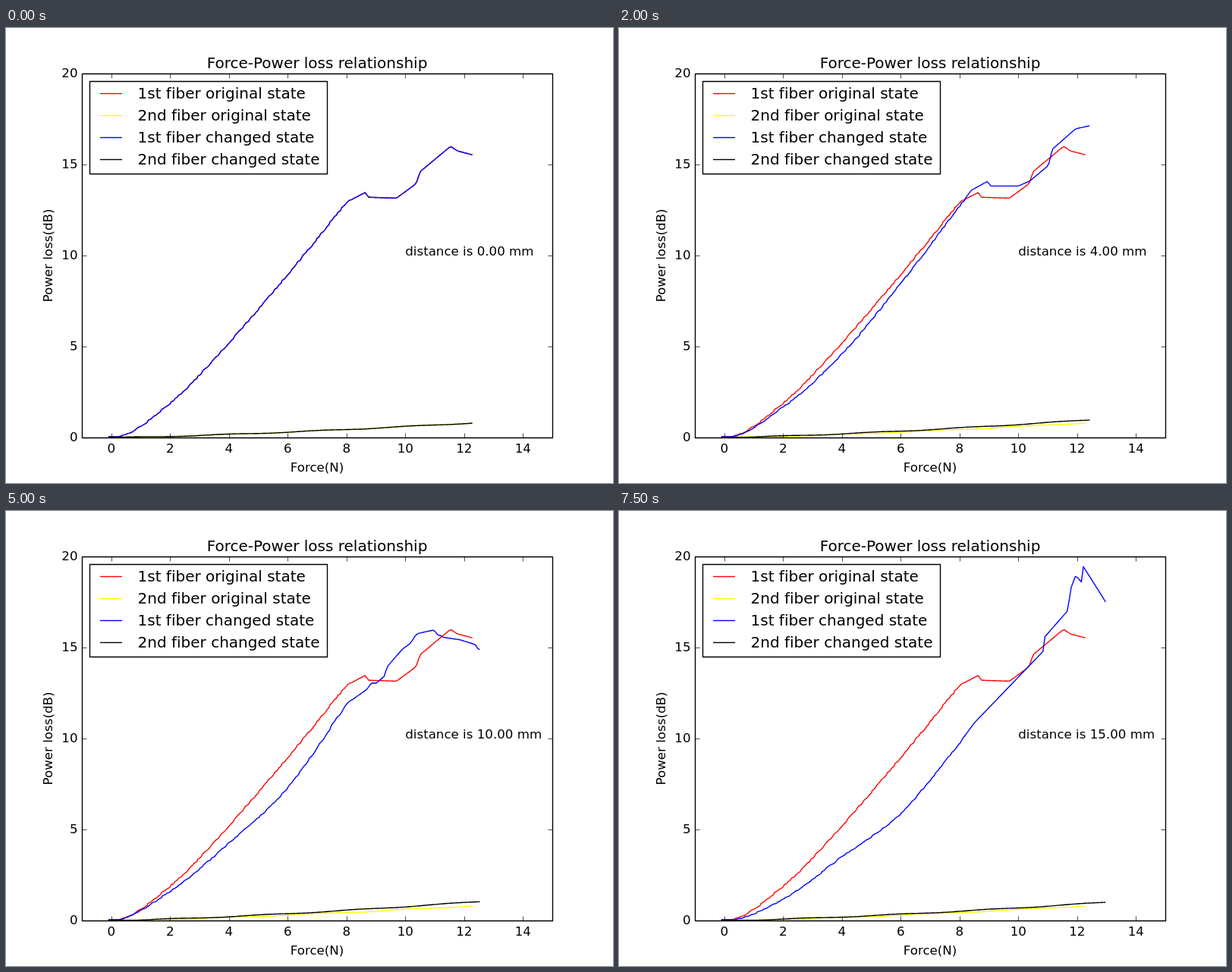
Write an HTML page that moves like this. It is 800 by 600 pixels and loops after 8000 ms.

```html
<!DOCTYPE html>
<html lang="en">
<head>
<meta charset="utf-8">
<style>
html, body { margin: 0; width: 100%; height: 100%; overflow: hidden; background: #fff; }
svg { display: block; font: 16.667px "DejaVu Sans", sans-serif; font-variant-ligatures: none; }
.line, .frame { fill: none; stroke-width: 1.389; stroke-linejoin: round; }
.frame { stroke: #000; }
.tick { stroke: #000; stroke-width: .694; }
.big { font-size: 20px; }
.mid { text-anchor: middle; }
.end { text-anchor: end; }
</style>
</head>
<body>
<svg width="800" height="600" viewBox="0 0 800 600">
  <clipPath id="plot"><rect x="100" y="60" width="620" height="480.5"/></clipPath>
  <g id="curves" clip-path="url(#plot)"></g>
  <g id="axes"></g>
  <rect class="frame" x="100.5" y="60.5" width="620" height="480"/>
  <text class="big mid" x="410" y="53">Force-Power loss relationship</text>
  <text class="mid" x="410" y="585">Force(N)</text>
  <text class="mid" transform="translate(61 300) rotate(-90)">Power loss(dB)</text>
  <text id="distance" x="526.25" y="300"></text>
  <rect class="frame" x="110.5" y="70.5" width="313" height="122" style="fill:#fff"/>
  <g id="legend"></g>
</svg>
<script>
const STEP = 500, COUNT = 16, SAMPLES = 190, START = -0.1;
const byId = id => document.getElementById(id);
const px = force => 138.75 + 38.75 * force;
const py = loss => 540 - 24 * loss;
const mix = (a, b, t) => a + (b - a) * t;
const hash = k => { const s = Math.sin(k * 127.1 + 3.7) * 43758.5453; return s - Math.floor(s); };

function add(parent, tag, attrs, text = '') {
  const el = document.createElementNS('http://www.w3.org/2000/svg', tag);
  for (const key in attrs) el.setAttribute(key, attrs[key]);
  el.textContent = text;
  return parent.appendChild(el);
}

// rise: first fiber's loss at 2, 4, 6 and 8 N, joined smoothly
// kinks: its "force loss" corners beyond 8 N; tail: second fiber's last loss
const keys = [
  { mm: 0, rise: [1.88, 5.2, 8.95, 12.92], tail: .8,
    kinks: '8.63 13.46, 8.75 13.2, 9.7 13.15, 10.37 13.95, 10.5 14.6, 11.54 16, 11.77 15.75, 12.28 15.53' },
  { mm: 2, rise: [2.12, 5.3, 9.5, 12.4], tail: .85,
    kinks: '8.42 13.5, 9.17 14.95, 10 15.33, 10.12 14.88, 11.18 14.67, 11.31 14.37, 12.19 14.83, 12.26 15.5, 12.47 15.57' },
  { mm: 4, rise: [1.67, 4.58, 8.46, 12.7], tail: .97,
    kinks: '8.4 13.58, 8.98 14.1, 9.02 13.82, 10 13.82, 10.4 14.1, 11.03 14.96, 11.15 15.83, 11.95 16.96, 12.43 17.13' },
  { mm: 8, rise: [1.67, 4.43, 7.6, 13.05], tail: 1.07,
    kinks: '8.65 13.3, 8.8 13.88, 8.96 13.33, 10.12 14.6, 10.3 15.5, 11.13 16.3, 11.23 16, 12.32 15.55, 12.4 14.97, 12.47 14.92' },
  { mm: 11, rise: [1.57, 4.15, 7.15, 11.3], tail: 1.03,
    kinks: '9.32 13.33, 9.4 14.03, 9.92 15.2, 10.46 15.87, 11 15.9, 11.15 15.37, 11.9 15.25, 12.57 14.88' },
  { mm: 13, rise: [1.42, 3.8, 6.7, 10.1], tail: .95,
    kinks: '8.2 10.45, 8.42 11.58, 9.12 13.5, 9.89 14.8, 10.1 14.5, 10.87 14.68, 11 14.33, 11.9 14.58, 12.02 15, 12.73 16.06' },
  { mm: 15, rise: [1.17, 3.5, 5.87, 9.75], tail: 1,
    kinks: '8.5 10.85, 10.85 14.8, 10.9 15.58, 11.67 17, 11.8 18.3, 11.95 18.95, 12.16 18.58, 12.2 19.48, 12.68 18.25, 12.97 17.5' }
];
for (const key of keys) {
  const [a, , c, d] = key.rise;
  key.spline = [a, 0, ...key.rise, 2 * d - c];
  key.corners = [[8, d], ...key.kinks.split(', ').map(pair => pair.split(' ').map(Number))];
  key.end = key.corners.at(-1)[0];
}

function lossAt(key, force) {
  if (force <= 0) return 0;
  if (force < 8) {
    const i = Math.floor(force / 2), t = force / 2 - i;
    const [a, b, c, d] = key.spline.slice(i, i + 4);
    return b + t / 2 * (c - a + t * (2 * a - 5 * b + 4 * c - d + t * (3 * (b - c) + d - a)));
  }
  const i = Math.max(1, key.corners.findIndex(corner => corner[0] >= force));
  const [[f0, l0], [f1, l1]] = [key.corners[i - 1], key.corners[i]];
  return mix(l0, l1, (force - f0) / (f1 - f0));
}

// Curves between two measured distances blend both neighbours
function curves(mm) {
  const hi = keys.find(key => key.mm >= mm);
  const lo = keys.findLast(key => key.mm <= mm);
  const t = hi === lo ? 0 : (mm - lo.mm) / (hi.mm - lo.mm);
  const first = [], second = [];
  for (let i = 0; i <= SAMPLES; i++) {
    const u = i / SAMPLES;
    const at = key => lossAt(key, Math.min(key.end, mix(START, key.end, u)));
    const force = mix(START, mix(lo.end, hi.end, t), u);
    const loss = Math.max(.04, mix(at(lo), at(hi), t));
    const noise = force > .4 && force < 8.2 ? 1.6 * (hash(i + mm * 211) - .5) : 0;
    first.push(`${px(force) + noise},${py(loss) + noise / 2}`);
    const ripple = .02 * Math.sin(2 * force + mm);
    second.push(`${px(force)},${py(Math.max(.01, mix(lo.tail, hi.tail, t) * u ** 1.4 + ripple))}`);
  }
  return [first.join(' '), second.join(' ')];
}

for (let k = 0; k < 8; k++) {
  const x = Math.round(px(2 * k)) + .5;
  add(byId('axes'), 'path', { class: 'tick', d: `M${x} 540.5v-6M${x} 60.5v6` });
  add(byId('axes'), 'text', { class: 'mid', x: px(2 * k), y: 560 }, 2 * k);
}
for (let k = 0; k < 5; k++) {
  const y = py(5 * k) + .5;
  add(byId('axes'), 'path', { class: 'tick', d: `M100.5 ${y}h6M720.5 ${y}h-6` });
  add(byId('axes'), 'text', { class: 'end', x: 94.5, y: y + 4.8 }, 5 * k);
}

const labels = ['1st fiber original state', '2nd fiber original state',
  '1st fiber changed state', '2nd fiber changed state'];
const lines = ['#f00', '#ff0', '#00f', '#000'].map((stroke, i) => {
  const y = 86.5 + 29 * i;
  add(byId('legend'), 'path', { class: 'line', stroke, d: `M124 ${y}h29` });
  add(byId('legend'), 'text', { class: 'big', x: 173.5, y: y + 6.5 }, labels[i]);
  return add(byId('curves'), 'polyline', { class: 'line', stroke });
});

const states = Array.from({ length: COUNT }, (_, mm) => curves(mm));
const show = (offset, pair) => pair.forEach((points, i) => lines[offset + i].setAttribute('points', points));
show(0, states[0]);

const start = performance.now();
let shown = -1;
function draw() {
  const mm = Math.floor((performance.now() - start) / STEP) % COUNT;
  if (mm !== shown) {
    shown = mm;
    show(2, states[mm]);
    byId('distance').textContent = `distance is ${mm.toFixed(2)} mm`;
  }
  requestAnimationFrame(draw);
}
draw();
</script>
</body>
</html>
```
